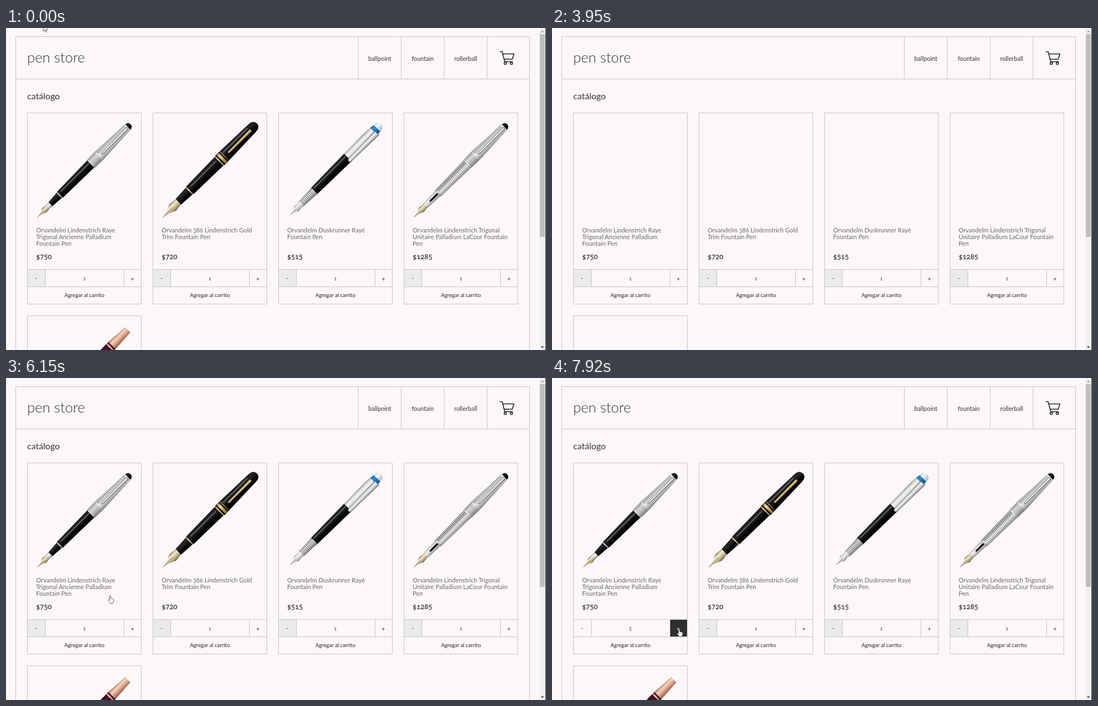
An HTML page for the animation above (8 s loop, 968 px wide and 578 px high).

```html
<!DOCTYPE html>
<html lang="es">
<head>
<meta charset="utf-8">
<title>pen store</title>
<style>
  html, body { margin: 0; width: 100%; height: 100%; overflow: hidden; background: #fcf8f9; }
  svg { display: block; width: 968px; height: 578px; font-family: Lato, "Open Sans", sans-serif; font-variant-numeric: oldstyle-nums; }
  .rule { fill: none; stroke: #c5c3c4; }
  .brand { font-size: 25.5px; font-weight: 300; fill: #333; }
  .heading { font-size: 15.8px; fill: #333; }
  .nav { font-size: 10.8px; fill: #333; text-anchor: middle; }
  .body { font-size: 11px; fill: #686868; }
  .price { font-size: 13px; font-weight: 600; fill: #333; }
  .qty { font-size: 9.5px; fill: #444; text-anchor: middle; }
  .sign { font-size: 12px; fill: #444; text-anchor: middle; }
  .add { font-size: 9.5px; fill: #222; text-anchor: middle; }
</style>
</head>
<body>
<svg id="stage" viewBox="0 0 968 578" xmlns="http://www.w3.org/2000/svg"></svg>
<script>
const LOOP = 8000;
const stage = document.getElementById('stage');

const text = (cls, x, y, str, extra = '') => `<text class="${cls}" x="${x}" y="${y}" ${extra}>${str}</text>`;
const rule = d => `<path class="rule" d="${d}"/>`;

// Gradients run across the barrel, from its upper to its lower edge.
const metals = {
  silver: ['#9c9c9c', '#f4f4f3', '#d2d2d1', '#808080'],
  steel: ['#777', '#dcdcda', '#b9b9b8', '#666'],
  black: ['#1c1c1d', '#262628', '#09090a', '#020202'],
  gold: ['#8d713a', '#f0dfa4', '#c4a45c', '#7b6028'],
  pale: ['#7d6f55', '#f4ecd8', '#cbb88f', '#6f5f45'],
  rose: ['#a86e56', '#f6d6c4', '#d79f85', '#8f553f'],
  wine: ['#2b0715', '#571230', '#38091b', '#1c030d'],
  blue: ['#1b6fae', '#2f93d6', '#1673b5', '#0d4f86'],
  glass: ['#c9d6de', '#f4f8fa', '#d5e0e7', '#a8b9c4']
};
const gradients = Object.entries(metals).map(([name, stops]) =>
  `<linearGradient id="${name}" x2="0" y2="1">` +
  stops.map((color, i) => `<stop offset="${[0, .3, .62, 1][i]}" stop-color="${color}"/>`).join('') +
  '</linearGradient>').join('');

// Pen parts lie along an axis that starts at the tip of the nib.
const part = (from, to, w0, w1, metal) =>
  `<path fill="url(#${metal})" d="M${from} ${-w0 / 2}L${to} ${-w1 / 2}V${w1 / 2}L${from} ${w0 / 2}Z"/>`;
const dome = (x, width, length, metal) =>
  `<path fill="url(#${metal})" d="M${x} ${-width / 2}q${length} 0 ${length} ${width / 2}t${-length} ${width / 2}z"/>`;
const nib = (length, width, metal) =>
  `<path fill="url(#${metal})" d="M0 0Q${length * .35} ${-width * .1} ${length * .6} ${-width / 2}L${length} ${-width * .36}V${width * .36}L${length * .6} ${width / 2}Q${length * .35} ${width * .1} 0 0"/>` +
  `<path stroke="#555" stroke-width=".8" d="M2 0H${length * .6}"/>`;
const ribs = (from, to, width, y = 0, opacity = .45) =>
  `<path d="M${from} ${y}H${to}" stroke="#222" stroke-opacity="${opacity}" stroke-width="${width}" stroke-dasharray="1.4 1.6"/>`;
const shine = (from, to, y) =>
  `<path d="M${from} ${y}H${to}" stroke="#8a8a8c" stroke-width="1.2"/>`;
const clip = (from, to, metal, y = 0, width = 5) =>
  `<path d="M${from} ${y - width / 3}L${to} ${y - width / 2}V${y + width / 2}L${from} ${y + width / 3}q-4 ${-width / 3} 0 ${-width * 2 / 3}" fill="url(#${metal})" stroke="#333" stroke-width=".7"/>`;

const silverCap = part(137, 158, 20, 21, 'silver') + part(158, 232, 21, 14, 'silver') +
  ribs(160, 228, 5, -5) + ribs(140, 156, 18, 0, .3) + clip(166, 229, 'silver', 1) + dome(231, 13, 7, 'black');

const pens = [
  nib(32, 11, 'pale') + part(28, 35, 9, 10, 'silver') + part(35, 57, 10, 13, 'black') +
    part(57, 59, 14, 14, 'steel') + part(59, 138, 15, 18, 'black') + shine(64, 136, -3) + silverCap,
  nib(44, 17, 'pale') + part(41, 68, 14, 17, 'black') + part(68, 70, 18, 18, 'gold') +
    part(70, 144, 19, 22, 'black') + shine(76, 140, -4) + part(144, 146, 23, 23, 'gold') + part(146, 228, 24, 19, 'black') +
    part(149, 154, 24, 24, 'gold') + part(157, 158, 24, 24, 'gold') + dome(227, 19, 13, 'black') +
    shine(160, 222, -6) + clip(168, 224, 'gold', 1),
  nib(30, 12, 'silver') + part(28, 60, 12, 15, 'silver') + ribs(32, 60, 13) + part(60, 63, 16, 16, 'steel') +
    part(63, 150, 16, 19, 'black') + shine(66, 146, -4) + part(148, 200, 19, 21, 'silver') + part(200, 218, 21, 18, 'silver') +
    part(214, 224, 18, 16, 'blue') + dome(222, 17, 11, 'glass') + clip(146, 216, 'silver', 6, 10),
  nib(34, 12, 'pale') + part(32, 62, 11, 13, 'silver') + part(42, 62, 3, 4, 'black') + part(62, 65, 15, 15, 'steel') +
    part(65, 138, 16, 19, 'silver') + ribs(66, 137, 6, -4, .75) + silverCap,
  nib(34, 12, 'gold') + part(34, 66, 10, 13, 'wine') + part(66, 186, 16, 18, 'wine') + part(185, 188, 18, 18, 'rose') +
    part(188, 191, 18, 18, 'wine') + part(191, 231, 18, 13, 'rose')
];

const products = [
  { lines: ['Orvandelm Lindenstrich Raye', 'Trigonal Ancienne Palladium', 'Fountain Pen'], price: 750 },
  { lines: ['Orvandelm 386 Lindenstrich Gold', 'Trim Fountain Pen'], price: 720 },
  { lines: ['Orvandelm Duskrunner Rayé', 'Fountain Pen'], price: 515 },
  { lines: ['Orvandelm Lindenstrich Trigonal', 'Unitaire Palladium LaCour Fountain', 'Pen'], price: 1285 },
  { lines: [], price: 680 }
];

function card({ lines, price }, i) {
  const x = 38 + (i % 4) * 225, y = i < 4 ? 152 : 516;
  const [tipX, tipY] = i === 2 ? [20, 185] : [17, 189];
  return `<g transform="translate(${x} ${y})">
    <g class="pen" transform="translate(${tipX} ${tipY}) rotate(-45)">${pens[i]}</g>
    ${lines.map((line, n) => text('body', 16, 214.5 + n * 12, line)).join('')}
    ${text('price', 16, 263, '$' + price)}
    <rect class="minus" x="1" y="281" width="31" height="31" fill="#ebebeb"/>
    <rect class="plus" x="173" y="281" width="31" height="31" fill="none"/>
    ${rule('M.5.5H204.5V343.5H.5ZM0 281.5H205M0 312.5H205M32.5 282V312M173.5 282V312')}
    ${text('sign', 16, 301, '-')}${text('qty', 102.5, 300.5, 1)}${text('sign', 188.5, 302, '+', 'data-plus=""')}
    ${text('add', 102.5, 331, 'Agregar al carrito')}
  </g>`;
}

stage.innerHTML = `<defs>${gradients}</defs>
  <rect width="968" height="578" fill="#fcf8f9"/>
  ${rule('M17.5 578V15.5H938.5V578M17 91.5H939M631.5 16V91M708.5 16V91M785.5 16V91M862.5 16V91')}
  ${text('brand', 38, 62, 'pen store')}
  ${['ballpoint', 'fountain', 'rollerball'].map((name, i) => text('nav', 670 + i * 77, 58.5, name)).join('')}
  <g fill="none" stroke="#222" stroke-width="1.6" stroke-linejoin="round">
    <path d="M885 42.5H889.5L894 60.5H908.5M890.5 46.5H910.5L907.5 56H893"/>
    <circle cx="895" cy="63.5" r="2"/><circle cx="906" cy="63.5" r="2"/>
  </g>
  ${text('heading', 38, 128, 'catálogo')}
  ${text('body', 38, 162, 'Cargando productos...', 'id="loading"')}
  <g id="catalog">${products.map(card).join('')}</g>
  <rect x="956" width="12" height="578" fill="#f1f0f0"/>
  <rect id="thumb" x="957" y="11" width="9" height="364" fill="#c0bfbf"/>
  <path d="M958.5 7.5L961.5 4.5L964.5 7.5Z" fill="#999"/><path d="M958.5 571.5H964.5L961.5 574.5Z" fill="#444"/>
  <path d="M967.5 0V578" stroke="#222"/>
  <g id="cursor" fill="#fff" stroke="#333" stroke-width=".8" stroke-linejoin="round">
    <path id="arrow" d="M0 0V11L2.6 8.6L4.4 12.6L6 12L4.3 8H8Z"/>
    <path id="hand" transform="translate(-4.3 -.5)" d="M3.2 9V1.6a1.1 1.1 0 0 1 2.2 0V6l4 .8q1.4.4 1.3 1.8l-.6 3.4-1.2 3H4.6L.8 10q-.6-1.2.5-1.5z"/>
  </g>`;

const find = id => document.getElementById(id);
const show = (el, on) => el.style.display = on ? '' : 'none';
const penEls = [...stage.querySelectorAll('.pen')];
const minus = stage.querySelector('.minus'), plus = stage.querySelector('.plus');
const plusSign = stage.querySelector('[data-plus]'), qty = stage.querySelector('.qty');

const LOAD_START = 1930, LOAD_END = 3950, HOVER = 6550;
const imageTimes = [3970, 4020, 4065, 4110, 4160];
const clicks = [7360, 7550, 7740, 7920];
const path = [[4980, 70, -6], [5390, 132.5, 316], [5770, 166, 354], [5850, 166, 354], [6550, 214, 438], [6650, 228, 450]];

const clamp = v => Math.max(0, Math.min(1, v));
const easeOut = v => 1 - (1 - clamp(v)) ** 2;
const mix = (a, b, k) => a + (b - a) * k;

function cursorAt(t) {
  if (t < 530) return [67, -5];
  if (t < 930) return [1.5, -5];
  if (t < path[0][0]) return null;
  const next = path.findIndex(p => p[0] > t);
  if (next < 0) return path[path.length - 1].slice(1);
  const [t0, x0, y0] = path[next - 1], [t1, x1, y1] = path[next];
  const k = (t - t0) / (t1 - t0);
  return [mix(x0, x1, k), mix(y0, y1, k)];
}

function draw(t) {
  const loading = t >= LOAD_START && t < LOAD_END;
  show(find('loading'), loading);
  show(find('catalog'), !loading);
  find('thumb').setAttribute('height', loading ? 528 : 364);
  penEls.forEach((el, i) => show(el, t < LOAD_START || t >= imageTimes[i]));

  const hover = easeOut((t - HOVER) / 300);
  plus.setAttribute('fill', `rgba(47,47,47,${hover})`);
  const tone = mix(68, 255, hover);
  plusSign.style.fill = `rgb(${tone},${tone},${tone})`;
  minus.setAttribute('opacity', 1 - easeOut((t - clicks[0]) / 300));
  qty.textContent = 1 + clicks.filter(click => t >= click).length;

  const pos = cursorAt(t);
  show(find('cursor'), pos);
  if (!pos) return;
  const [x, y] = pos;
  const onLink = x > 38 && x < 243 && y > 152 && (y < 433 || x > 211);
  show(find('hand'), onLink);
  show(find('arrow'), !onLink);
  find('cursor').setAttribute('transform', `translate(${x} ${y})`);
}

const start = performance.now();
function tick() {
  draw((performance.now() - start) % LOOP);
  requestAnimationFrame(tick);
}
tick();
</script>
</body>
</html>
```
